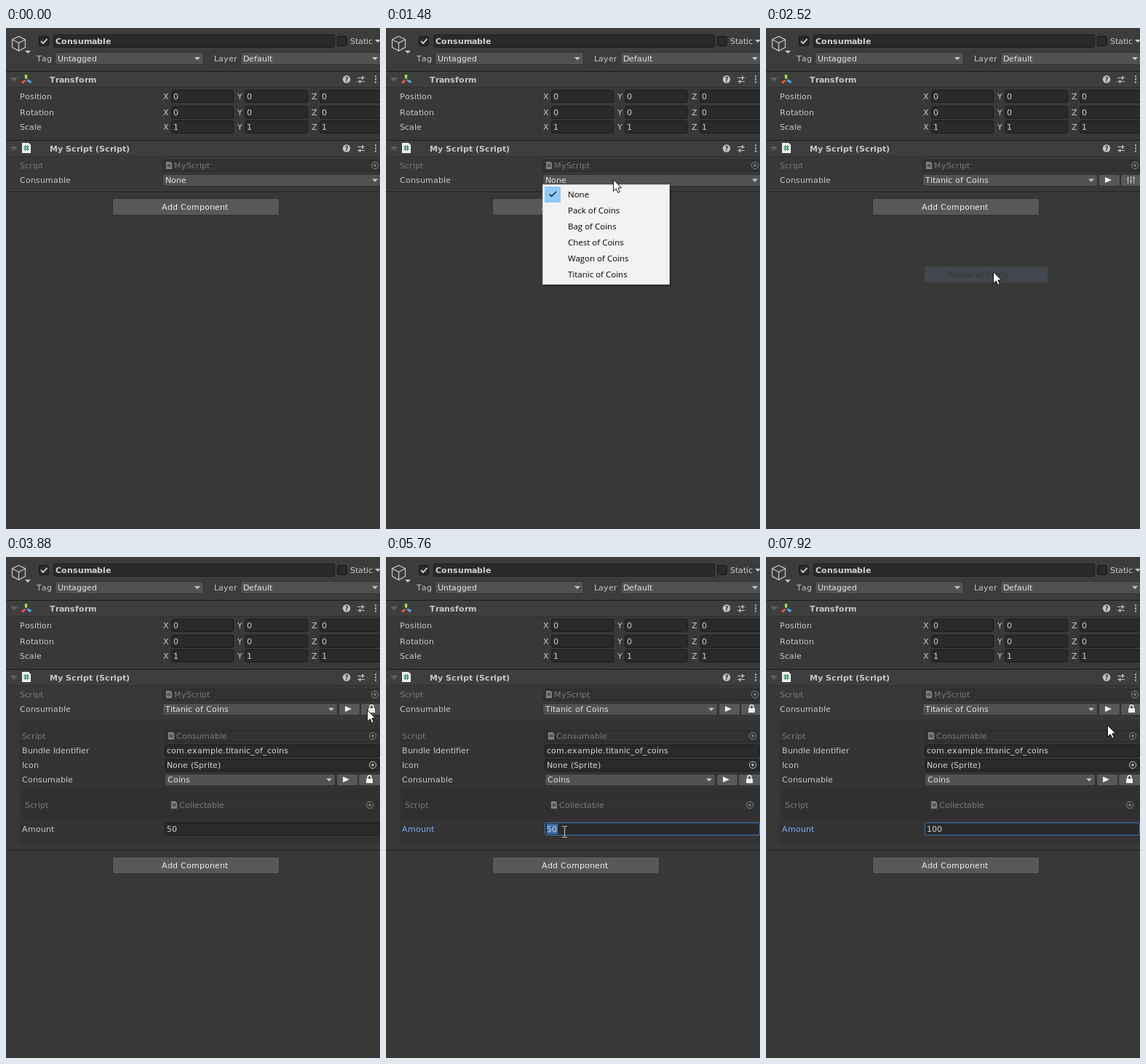
An HTML page for the animation above (8 s loop, 514x689 px).

```html
<!DOCTYPE html>
<html lang="en">
<head>
<meta charset="utf-8">
<title>Inspector</title>
<style>
  html, body { margin: 0; width: 100%; height: 100%; overflow: hidden; background: #383838; }
  svg { position: absolute; left: 0; top: 0; display: block; }
  text { font: 11px "DejaVu Sans", sans-serif; white-space: pre; }
  text.bold { font-weight: 700; }
  text.menu { font: 11.5px "Open Sans", "Noto Sans", sans-serif; }
</style>
</head>
<body>
<svg id="stage" width="514" height="689" viewBox="0 0 514 689"></svg>
<script>
const LOOP = 8000, TICK = 40;
const INK = '#c8c8c8', BRIGHT = '#e4e4e4', DIM = '#7a7a7a', BLUE = '#7baefa', HOVER = '#91c9f7';
const ITEMS = ['None', 'Pack of Coins', 'Bag of Coins', 'Chest of Coins', 'Wagon of Coins', 'Titanic of Coins'];
const ROW = 22, MENU_TOP = 218;

// Pointer stops: time, x, y
const PATH = [
  [120, 464, 672], [400, 428, 470], [680, 345, 250], [920, 314, 202],
  [1440, 314, 202], [1480, 312, 208], [1920, 312, 335], [2560, 312, 335],
  [2960, 403, 269], [3520, 497, 210], [3760, 496, 210], [3920, 496, 210],
  [4520, 257, 311], [4560, 257, 311], [4960, 177, 335], [5400, 243, 372],
  [5560, 246, 386], [5760, 245, 377], [7520, 245, 377], [7920, 469, 231]
];

const pen = document.createElement('canvas').getContext('2d');

// Interface text advances by whole pixels
function label(x, y, str, fill = INK, bold = false) {
  pen.font = `${bold ? 700 : 400} 11px "DejaVu Sans", sans-serif`;
  let at = x;
  const xs = [...str].map(ch => {
    const here = at;
    at += Math.round(pen.measureText(ch).width + 0.01);
    return here;
  });
  return `<text x="${xs.join(' ')}" y="${y}" fill="${fill}"${bold ? ' class="bold"' : ''}>${str}</text>`;
}

const rect = (x, y, w, h, fill) => `<rect x="${x}" y="${y}" width="${w}" height="${h}" fill="${fill}"/>`;
const path = (d, fill) => `<path d="${d}" fill="${fill}"/>`;
const line = (d, stroke, w = 1) => `<path d="${d}" fill="none" stroke="${stroke}" stroke-width="${w}"/>`;
const box = (x, y, w, h, fill, stroke) =>
  `<rect x="${x + .5}" y="${y + .5}" width="${w - 1}" height="${h - 1}" rx="2.5" fill="${fill}" stroke="${stroke}"/>`;
const group = (id, body) => `<g id="${id}">${body}</g>`;

const input = (x, y, w, h = 18, stroke = '#1c1c1c') => box(x, y, w, h, '#2a2a2a', stroke);
const button = (x, y, w, h) => box(x, y, w, h, '#585858', '#303030');
const arrow = (x, y, fill = '#c4c4c4') => path(`M${x} ${y}h8l-4 4.3z`, fill);

function dropdown(x, y, w, h, str, arrowX, textX = x + 4) {
  return box(x, y, w, h, '#515151', '#303030') + label(textX, y + 12 + (h > 17 ? 1 : 0), str, BRIGHT) + arrow(arrowX, y + h / 2 - 2);
}

function target(x, y, fill) {
  return `<circle cx="${x}" cy="${y}" r="4.6" fill="none" stroke="${fill}"/><circle cx="${x}" cy="${y}" r="1.7" fill="${fill}"/>`;
}

// Read-only script reference
function scriptRow(labelX, x, y, w, str, targetX) {
  const ix = x + 5, iy = y + 3;
  return label(labelX, y + 12, 'Script', DIM) + box(x, y, w, 17, '#323232', '#2a2a2a') +
    path(`M${ix} ${iy}h6l2 2v8h-8z`, '#848484') +
    line(`M${ix + 2.8} ${iy + 2.5}v5M${ix + 5.2} ${iy + 2.5}v5M${ix + 1.5} ${iy + 4}h5M${ix + 1.5} ${iy + 6}h5`, '#383838', .8) +
    label(x + 16, y + 12, str, DIM) + target(targetX, y + 8, '#858585');
}

const play = (x, y) => path(`M${x} ${y - 4}v8l9-4z`, '#eee');
const lock = (x, y) => rect(x - 4, y - 1, 9, 6, '#eee') + line(`M${x - 2} ${y - 1}v-2a2.5 2.5 0 0 1 5 0v2`, '#eee', 1.5);
const sliders = (x, y) =>
  line(`M${x - 3.5} ${y - 5}v10M${x + .5} ${y - 5}v10M${x + 4.5} ${y - 5}v10`, '#c4c4c4') +
  line(`M${x - 5} ${y - 1.5}h3M${x - 1} ${y + 1.5}h3M${x + 3} ${y - 2.5}h3`, '#c4c4c4');

function header(y, title) {
  const m = y + 11;
  return rect(0, y - 1, 514, 1, '#1a1a1a') + rect(0, y, 514, 21, '#3e3e3e') + rect(0, y + 21, 514, 1, '#303030') +
    path(`M6 ${m - 3}h10l-5 6z`, '#606060') + label(60, m + 4, title, INK, true) +
    `<circle cx="468" cy="${m - .5}" r="5.2" fill="#c4c4c4"/>` +
    `<text x="468" y="${m + 3}" text-anchor="middle" style="font-size:9px;font-weight:700" fill="#3e3e3e">?</text>` +
    line(`M483 ${m - 2.5}h10M483 ${m + 2.5}h10`, '#c4c4c4') + line(`M490 ${m - 5}v5M486.5 ${m}v5`, '#c4c4c4', 1.6) +
    [-4, 0, 4].map(d => rect(507, m + d - 1.5, 2, 2, '#c4c4c4')).join('');
}

function vectorRow(name, y, value) {
  return label(19, y + 13, name) + ['X', 'Y', 'Z'].map((axis, i) => {
    const x = 227 + i * 101 + (i > 1 ? 2 : 0);
    return label([216, 318, 420][i], y + 13, axis) + input(x, y, i ? 87 : 86) + label(x + 3, y + 13, value, '#d2d2d2');
  }).join('');
}

function footer(y) {
  return rect(0, y, 514, 1, '#1a1a1a') + rect(0, y + 1, 514, 1, '#404040') +
    button(146, y + 9, 230, 24) + label(214, y + 25, 'Add Component', '#eee');
}

const menuText = i => `<text class="menu" x="250" y="${MENU_TOP + 15 + i * ROW}" fill="#000">${ITEMS[i]}</text>`;
const rowBar = i => rect(218, MENU_TOP + i * ROW, 169, ROW, HOVER);

const titleBar = rect(0, 0, 514, 59, '#3c3c3c') +
  line('M17.5 11.5L26.5 16V26.5L17.5 31.5L8.5 26.5V16ZM8.5 16L17.5 20.5L26.5 16M17.5 20.5V31.5', '#c4c4c4', 1.3) +
  arrow(26, 31) +
  box(45, 11, 14, 14, '#2a2a2a', '#151515') + line('M48 18l3 3 5.5-6', '#e8e8e8', 1.6) +
  input(65, 9, 387) + label(68, 22, 'Consumable', '#d2d2d2', true) +
  box(455, 11, 14, 14, '#2a2a2a', '#151515') + label(473, 22, 'Static') + arrow(507, 16) +
  label(42, 46, 'Tag') + dropdown(67, 33, 205, 18, 'Untagged', 259) +
  label(286, 46, 'Layer') + dropdown(322, 33, 200, 18, 'Default', 503);

const transform = header(60, 'Transform') +
  path('M25.5 65q2-2 4 0l-.8 5h-2.4z', '#9be04b') +
  path('M29.5 70.5l5 2.2q.8 2.6-1.6 3.3l-4.4-3.5z', '#4aa8f0') +
  path('M26 71l1.2 2-3.6 3.3q-2.6 0-2.3-2.8z', '#f2553d') +
  vectorRow('Position', 85, '0') + vectorRow('Rotation', 107, '0') + vectorRow('Scale', 127, '1');

const script = header(155, 'My Script (Script)') +
  path('M22 158h9l3 3v11h-12z', '#f0f0f0') +
  line('M26.5 161v8M29.5 161v8M24 163.5h8M24 166.5h8', '#2f7d4f', 1.2) +
  scriptRow(19, 215, 181, 306, 'MyScript', 507) + label(19, 213, 'Consumable');

const picked = dropdown(215, 201, 241, 17, ITEMS[5], 443) + button(457, 201, 30, 17) + play(466, 209) + button(487, 201, 36, 17);

const details = rect(18, 224, 496, 170, '#333') +
  scriptRow(22, 218, 238, 300, 'Consumable', 504) +
  label(22, 270, 'Bundle Identifier') + input(218, 258, 296, 17) + label(221, 270, 'com.example.titanic_of_coins', '#d2d2d2') +
  label(22, 290, 'Icon') + input(218, 278, 296, 17) + label(221, 290, 'None (Sprite)', '#d2d2d2') + target(504, 286, '#c4c4c4') +
  label(22, 310, 'Consumable') + dropdown(218, 298, 235, 17, 'Coins', 440) +
  button(454, 298, 30, 17) + play(463, 306) + button(484, 298, 34, 17) + lock(499, 306) +
  rect(22, 318, 492, 43, '#303030') + scriptRow(26, 222, 333, 288, 'Collectable', 500) +
  group('amount', '') + footer(403);

const menu = rect(217, 217, 175, 138, 'rgba(0,0,0,.3)') +
  '<rect x="215.5" y="215.5" width="174" height="137" fill="#f2f2f2" stroke="#ccc"/>' +
  rowBar(0).replace('width="169"', 'width="22"') + group('hover', rowBar(0)) +
  line('M224.5 228.5l3 3 6.5-6.5', '#111', 1.3) + ITEMS.map((_, i) => menuText(i)).join('');

const pointer =
  group('arrow', '<path d="M.5 .5V16.5L4.3 12.8L6.8 18.5L9.3 17.4L6.9 11.8H11.5Z" fill="#fff" stroke="#000" stroke-width=".9"/>') +
  group('beam', line('M-3 -6.5h3M1 -6.5h3M.5 -6v14M-3 8.5h3M1 8.5h3', '#d8d8d8'));

const $ = id => document.getElementById(id);
$('stage').innerHTML = titleBar + transform + script +
  group('unset', dropdown(215, 201, 306, 17, 'None', 503)) +
  group('picked', picked + group('closed', sliders(501, 209)) + group('locked', lock(502, 209))) +
  group('plain', footer(225)) + group('details', details) +
  group('menu', menu) + group('ghost', rowBar(5) + menuText(5)) + group('pointer', pointer);

const show = (id, on) => { $(id).style.display = on ? '' : 'none'; };

function pointerAt(t) {
  const i = PATH.findIndex(p => p[0] > t);
  if (i < 1) return PATH[i < 0 ? PATH.length - 1 : 0].slice(1);
  const [t0, x0, y0] = PATH[i - 1], [t1, x1, y1] = PATH[i];
  const k = (t - t0) / (t1 - t0);
  return [Math.round(x0 + (x1 - x0) * k), Math.round(y0 + (y1 - y0) * k)];
}

function amountField(t) {
  const focus = t >= 5520, typing = t >= 6400;
  const value = !typing ? '50' : t < 6680 ? '1' : t < 6880 ? '10' : '100';
  return label(22, 378, 'Amount', focus ? BLUE : INK) +
    input(218, 365, 296, 18, focus ? '#3a79bb' : '#1c1c1c') +
    (focus && !typing ? rect(221, 367, 15, 14, '#3d6fac') : '') +
    label(221, 378, value, '#d2d2d2') +
    (typing && t < 7120 ? rect(221 + 7 * value.length, 367, 1, 13, '#d2d2d2') : '');
}

function render(time) {
  const t = Math.floor(time / TICK) * TICK;
  const [x, y] = pointerAt(t);
  const chosen = t >= 2160, open = t >= 3760;

  show('unset', !chosen);
  show('picked', chosen);
  show('closed', !open);
  show('locked', open);
  show('plain', !open);
  show('details', open);
  if (open) $('amount').innerHTML = amountField(t);

  show('menu', t >= 1040 && !chosen);
  $('menu').setAttribute('opacity', Math.min(1, Math.max(0, (t - 1000) / 160)));
  const row = Math.floor((y - MENU_TOP) / ROW);
  show('hover', t >= 1480 && row >= 0 && row < ITEMS.length);
  $('hover').setAttribute('transform', `translate(0 ${row * ROW})`);
  show('ghost', chosen && t < 2600);
  $('ghost').setAttribute('opacity', Math.max(.1, 1 - (t - 2160) / 400));

  const overText = open && x > 218 && ((y >= 258 && y < 275) || (y >= 365 && y < 390));
  show('pointer', t >= 120);
  show('arrow', !overText);
  show('beam', overText);
  $('pointer').setAttribute('transform', `translate(${x} ${y})`);
}

const start = performance.now();
function loop() {
  render((performance.now() - start) % LOOP);
  requestAnimationFrame(loop);
}
loop();
</script>
</body>
</html>
```
